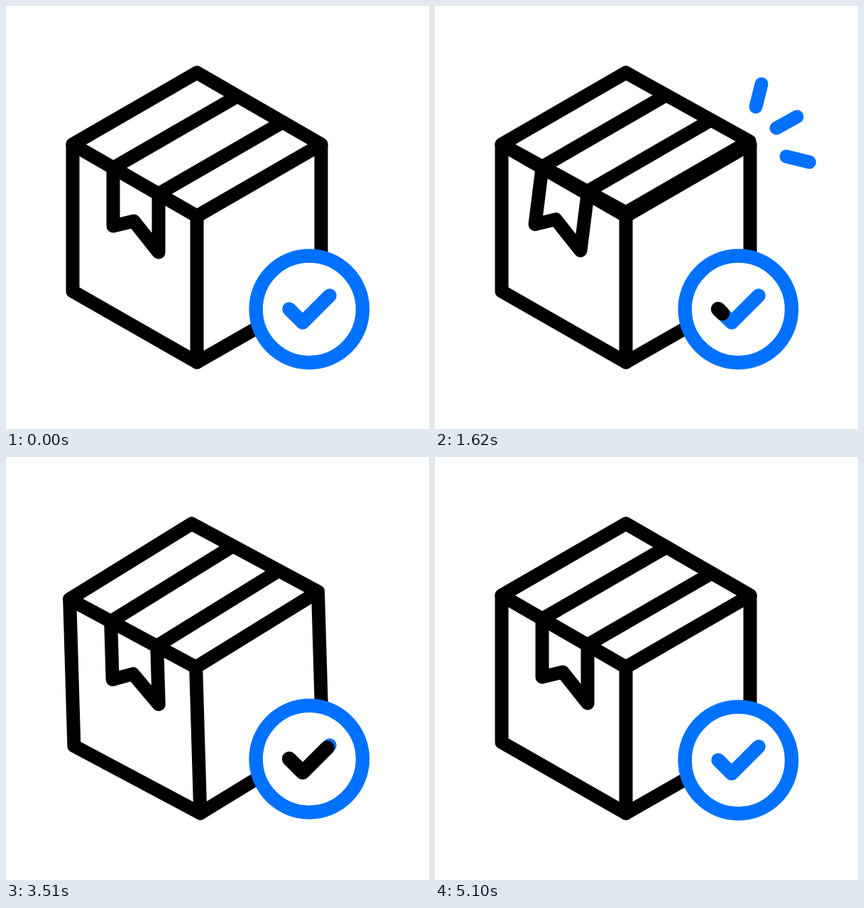
Animation, 596 px wide and 596 px high, one loop 5400 ms. Source, as an HTML page with a canvas:

```html
<!DOCTYPE html>
<html lang="en">
<head>
<meta charset="utf-8">
<title>Parcel check</title>
<style>
  html, body { margin: 0; width: 100%; height: 100%; overflow: hidden; background: #fff; }
  canvas { display: block; }
</style>
</head>
<body>
<canvas id="stage" width="596" height="596"></canvas>
<script>
const ctx = document.getElementById('stage').getContext('2d');
const BLACK = '#000', BLUE = '#0071ff', WHITE = '#fff';
const STEP = 30, LAST = 170, LOOP = 5400;

const back = [269, 94], left = [94, 195], front = [269, 296], right = [444, 195];
const leftLow = [94, 402], frontLow = [269, 502], rightLow = [444, 402];
const pivot = [269, 342];

// Each track is a list of [step, value] keys.
const lidTrack = [[0, 0], [30, 1], [50, 0], [70, .235], [90, 0]];
const ribbonTrack = [[30, 0], [50, -1], [70, 1], [90, -1], [110, 0]];
const tiltTrack = [[100, 0], [110, 3], [120, -3], [130, 3], [140, -3], [150, 3], [160, 0]];
const badgeTrack = [[0, 0], [20, 44], [30, 44], [50, 0], [70, 0], [95, 44], [120, 0], [145, 44], [170, 0]];
const inkEnd = [[50, 0], [70, 1], [100, 1], [100, 0], [120, 1]];
const inkStart = [[70, 0], [90, 1], [100, 1], [100, 0], [120, 0], [140, 1]];
const sparkEnd = [[44, 0], [52, 1]];
const sparkStart = [[58, 0], [67, 1]];

const mix = (a, b, k) => a + (b - a) * k;
const between = (p, q, k) => [mix(p[0], q[0], k), mix(p[1], q[1], k)];
const smooth = k => k * k * (3 - 2 * k);

function valueAt(track, f) {
  const i = track.findIndex(key => key[0] > f);
  if (i === 0) return track[0][1];
  if (i < 0) return track[track.length - 1][1];
  const [f0, v0] = track[i - 1], [f1, v1] = track[i];
  return mix(v0, v1, smooth((f - f0) / (f1 - f0)));
}

function path(points, { color = BLACK, width = 19, close = false, fill } = {}) {
  ctx.beginPath();
  points.forEach(p => ctx.lineTo(...p));
  if (close) ctx.closePath();
  if (fill) {
    ctx.fillStyle = fill;
    ctx.fill();
  }
  ctx.strokeStyle = color;
  ctx.lineWidth = width;
  ctx.stroke();
}

// Part of a polyline between two fractions of its length.
function trim(points, from, to) {
  const lengths = points.slice(1).map((p, i) => Math.hypot(p[0] - points[i][0], p[1] - points[i][1]));
  const total = lengths.reduce((a, b) => a + b);
  const out = [];
  let done = 0;
  lengths.forEach((len, i) => {
    const a = Math.max(0, (from * total - done) / len);
    const b = Math.min(1, (to * total - done) / len);
    if (a < b) out.push(between(points[i], points[i + 1], a), between(points[i], points[i + 1], b));
    done += len;
  });
  return out;
}

function drawRibbon(swing) {
  const hang = (x, y) => [x + 12.6 * swing, y - 3 * Math.abs(swing)];
  path([[151, 228], hang(151, 310), hang(180, 303), hang(215, 347), [215, 265]]);
}

function drawLid(open) {
  const near = between(front, back, open);
  const far = between(right, [406, 14.5], open);
  path([left, back, far, near], { close: true, fill: WHITE });
  for (const k of [.327, .69]) path([between(left, near, k), between(back, far, k)]);
}

function drawBox(f) {
  ctx.save();
  ctx.translate(...pivot);
  ctx.rotate(valueAt(tiltTrack, f) * Math.PI / 180);
  ctx.translate(-pivot[0], -pivot[1]);
  path([left, leftLow, frontLow, rightLow, right]);
  path([back, frontLow]);
  path([left, back, right, front], { close: true });
  drawRibbon(valueAt(ribbonTrack, f));
  drawLid(valueAt(lidTrack, f));
  ctx.restore();
}

function drawSparks(f) {
  const from = valueAt(sparkStart, f), to = valueAt(sparkEnd, f);
  if (to <= from) return;
  const rays = [[[452, 142], [460, 110]], [[481, 172], [510, 156]], [[495, 212], [527.5, 220]]];
  rays.forEach(ray => path(trim(ray, from, to), { color: BLUE }));
}

function drawBadge(f) {
  const tick = [[399, 427], [418, 446], [456, 408]];
  ctx.save();
  ctx.translate(0, -valueAt(badgeTrack, f));
  ctx.beginPath();
  ctx.arc(427.3, 427.2, 75.2, 0, Math.PI * 2);
  ctx.fillStyle = WHITE;
  ctx.fill();
  ctx.strokeStyle = BLUE;
  ctx.lineWidth = 19.5;
  ctx.stroke();
  path(tick, { color: BLUE, width: 19.5 });
  const ink = trim(tick, valueAt(inkStart, f), valueAt(inkEnd, f));
  if (ink.length) path(ink, { width: 20.5 });
  ctx.restore();
}

ctx.lineCap = ctx.lineJoin = 'round';
const began = performance.now();

function render() {
  const time = (performance.now() - began) % LOOP;
  const f = Math.min(LAST, Math.floor(time / STEP));
  ctx.fillStyle = WHITE;
  ctx.fillRect(0, 0, 596, 596);
  drawBox(f);
  drawSparks(f);
  drawBadge(f);
  requestAnimationFrame(render);
}
render();
</script>
</body>
</html>
```
